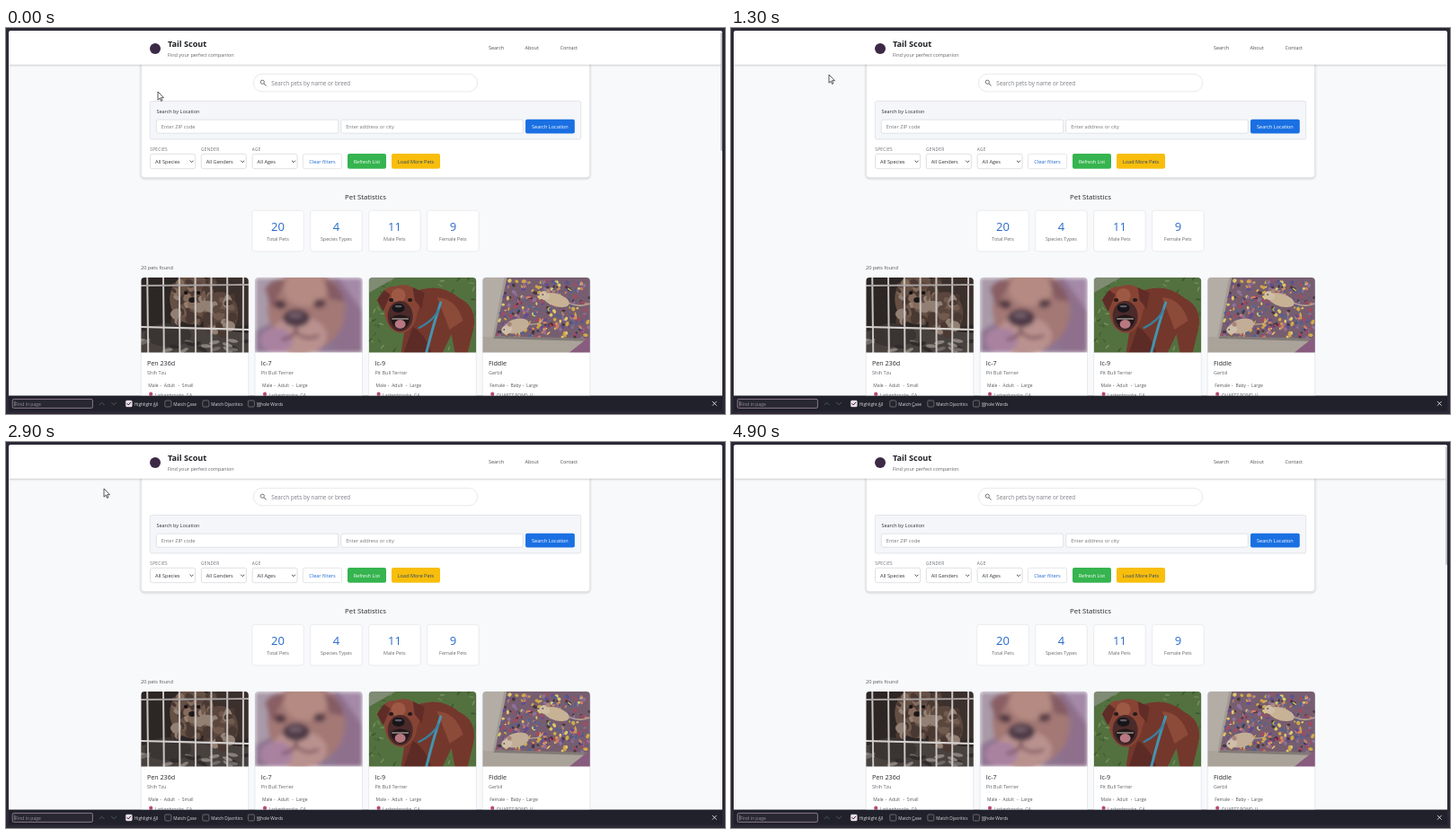
These frames come from a looping animation (800 px wide and 430 px high, 5000 ms). An HTML page:

```html
<!DOCTYPE html>
<html lang="en">
<head>
<meta charset="utf-8">
<title>Pet search page</title>
<style>
html, body { margin: 0; width: 100%; height: 100%; overflow: hidden; background: #2d2836; }
svg { display: block; width: 800px; height: 430px; }
text { font-family: "Open Sans", "Noto Sans", sans-serif; white-space: pre; }
</style>
</head>
<body>
<svg id="stage" viewBox="0 0 800 430"></svg>
<script>
const stage = document.getElementById('stage');

const text = (x, y, str, size, fill, extra = '') =>
  `<text x="${x}" y="${y}" font-size="${size}" fill="${fill}" ${extra}>${str}</text>`;
const mid = 'text-anchor="middle"';
const box = (x, y, w, h, r, fill, stroke = 'none', extra = '') =>
  `<rect x="${x}" y="${y}" width="${w}" height="${h}" rx="${r}" fill="${fill}" stroke="${stroke}" stroke-width=".7" ${extra}/>`;
const oval = (x, y, rx, ry, fill, turn = 0) =>
  `<ellipse cx="${x}" cy="${y}" rx="${rx}" ry="${ry}" fill="${fill}" transform="rotate(${turn} ${x} ${y})"/>`;
const shape = (d, fill) => `<path d="${d}" fill="${fill}"/>`;
const line = (d, stroke, w = 1) =>
  `<path d="${d}" fill="none" stroke="${stroke}" stroke-width="${w}" stroke-linecap="round" stroke-linejoin="round"/>`;

let seed = 7;
const rand = () => (seed = seed * 16807 % 2147483647) / 2147483647;
const times = (n, f) => Array.from({ length: n }, (_, i) => f(i)).join('');
const pick = list => list[Math.floor(rand() * list.length)];

// Photos, each 120 by 84
function cage() {
  const fur = ['#5b463d', '#715a4d', '#846b5b', '#4a3932', '#938074'];
  const tuft = (x, y, w, h) => oval(x + (rand() - .5) * w, y + (rand() - .5) * h,
    3 + rand() * 4, 2 + rand() * 4, pick(fur), rand() * 180);
  return box(0, 0, 120, 84, 0, '#2c2625') + shape('M0 60L40 54 120 62V84H0Z', '#48423f') +
    shape('M74 0H120V52L92 58Z', '#3c302c') +
    oval(57, 24, 25, 28, '#665044') + oval(88, 40, 20, 24, '#5a463e') + oval(30, 64, 26, 13, '#3a3433') +
    times(46, () => tuft(58, 27, 44, 50)) + times(26, () => tuft(88, 42, 30, 42)) +
    times(18, () => oval(rand() * 118, 68 + rand() * 15, 6, 2, pick(['#6f6a68', '#312c2c', '#87807b']), rand() * 60 - 30)) +
    oval(50, 17, 2.2, 2, '#171213') + oval(64, 17, 2.2, 2, '#171213') + oval(57, 25, 4, 3, '#1d1718') +
    times(7, i => line(`M${7 + i * 17.8} 0L${8 + i * 17.6} 84`, '#c9c5c3', 2)) +
    line('M0 9L120 8', '#aaa5a4', 1.8) + line('M0 55L120 58', '#d5d1ce', 2.2);
}

function closeUp() {
  return box(0, 0, 120, 84, 0, '#8d7591') + shape('M0 0H30L18 50 0 60Z', '#a99aa9') +
    shape('M78 0H120V84H90Z', '#8f6f8c') + shape('M93 0H120V38Z', '#a48aa8') +
    oval(57, 36, 43, 45, '#a37874', -8) + oval(56, 12, 24, 20, '#b48a82') +
    shape('M11 12Q24 -4 34 5L18 34Z', '#895f63') + shape('M77 2Q95 6 99 27L83 24Z', '#855c64') +
    oval(49, 65, 31, 22, '#b9918e') + oval(24, 70, 18, 14, '#a982a0') +
    oval(28, 30, 7, 5, '#553b43', 10) + oval(72, 29, 7, 5, '#5c3f48', -10) +
    oval(46, 45, 15, 10, '#4e3b46') + oval(45, 42, 8, 3, '#76606d') +
    line('M46 55Q46 66 31 69M46 61Q57 71 70 65', '#744f59', 3);
}

function leash() {
  return box(0, 0, 120, 84, 0, '#53713f') +
    times(90, () => oval(rand() * 120, rand() * 84, 3, .8, pick(['#6a8950', '#456237', '#78915f', '#3a5530']), rand() * 180)) +
    shape('M0 0H30L0 17Z', '#7f8b73') + shape('M46 18Q78 3 101 23Q120 32 117 55L110 84H96L92 63 82 84H36Z', '#74372c') +
    shape('M76 22Q97 23 105 48L90 58Z', '#8c4a38') + shape('M49 55Q62 62 70 84H39Z', '#5c2b26') +
    shape('M15 20Q17 9 29 10Q42 5 54 14Q61 24 54 40Q51 59 37 62Q22 61 18 43Z', '#874435') +
    shape('M17 14L9 25 16 38 24 19Z', '#602c27') + shape('M49 11L62 17 59 35 51 25Z', '#612c27') +
    oval(33, 20, 8, 8, '#9d5944') + oval(35, 43, 14, 17, '#4b2a2a') + oval(33, 34, 7, 5, '#171519') +
    oval(33, 32, 4, 1.3, '#5e5b65') + oval(25, 25, 2.6, 2, '#211a1c') + oval(46, 25, 2.6, 2, '#211a1c') +
    shape('M24 45Q35 38 46 45Q44 57 35 58Q26 56 24 45Z', '#211719') + oval(35, 52, 6, 5, '#b77882') +
    line('M26 46L44 46', '#d9cbc5', 1) + line('M80 28Q72 52 64 84', '#4594ae', 3) + line('M56 56Q72 48 78 36', '#397f9e', 2.5);
}

function bedding() {
  const bits = ['#d1a947', '#634c91', '#a9485f', '#4d6295', '#c88068', '#46383f', '#8f7198', '#dfc76a'];
  const chip = () => {
    const y = 3 + rand() * 65, x = 27 - y * .18 + rand() * (92 + y * .18);
    return oval(x, y, 1.2 + rand() * 1.6, .8 + rand() * 1.3, pick(bits), rand() * 180);
  };
  return box(0, 0, 120, 84, 0, '#a39c94') + shape('M0 0H24L11 67 0 69Z', '#b3ada6') +
    shape('M27 0H120V71L14 65Z', '#765e70') + times(300, chip) +
    shape('M0 66L120 69V84H0Z', '#aaa39a') + shape('M14 65L120 68V71L12 68Z', '#827a76') +
    shape('M96 84L120 65V84Z', '#885c7e') +
    line('M50 52Q66 53 67 46', '#c7aa93', 1.2) + oval(38, 54, 14, 8, '#c2ae96', -14) +
    oval(27, 58, 6, 5, '#cfbea9', -15) + oval(30, 52, 2.4, 2.6, '#a98278') + oval(24, 58, .8, .8, '#221b1c') +
    line('M95 28Q108 34 119 29', '#c8ad91', 1.3) + oval(82, 25, 15, 7, '#c7b296', 17) +
    oval(69, 20, 6, 5, '#d0bea4', 17) + oval(73, 15, 2.5, 2.5, '#af887c') + oval(67, 19, .8, .8, '#221b1c');
}

function petCard(x, photo, name, breed, facts, place, filter) {
  const xs = [8, 8 + facts[0].length * 2.9 + 6];
  xs.push(xs[1] + facts[1].length * 2.65 + 6.8);
  return box(x, 278, 119.6, 150, 4, '#fff', '#dfe1e5') +
    `<g transform="translate(${x} 278)"><g clip-path="url(#photo)"><g filter="url(#${filter})">${photo}</g></g>` +
    text(6.8, 98.2, name, 7.15, '#25272b') + text(6.8, 108, breed, 5.5, '#63666c') +
    facts.map((f, i) => text(xs[i], 122, f, 5, '#55585d') +
      (i ? oval(xs[i] - 3.7, 120.3, .5, .5, '#777') : '')).join('') +
    shape('M9 129.5A2 2 0 0 1 13 129.5Q13 131.5 11 134Q9 131.5 9 129.5Z', '#b84b72') +
    text(15.5, 132.7, place, 5, '#55585d') + '</g>';
}

const stat = (x, n, label) => box(x, 203.3, 57.6, 45.6, 3, '#fff', '#e2e4e8') +
  text(x + 28.8, 226, n, 13, '#2869cc', mid) + text(x + 28.8, 236.6, label, 5.45, '#65686d', mid);

const select = (x, label, value) =>
  text(x, 136.7, label, 4.65, '#63666c', 'letter-spacing=".35"') +
  box(x + .3, 140.3, 50, 16.4, 2, '#fff', '#d0d3d8') + text(x + 5.8, 151, value, 5.6, '#303238') +
  line(`M${x + 44.5} 148l1.7 1.7 1.7 -1.7`, '#333', .9);

const check = (x, label) => box(x, 415, 7, 7, 1.2, '#25242d', '#85838e') + text(x + 9.5, 420.6, label, 4.75, '#dedce3');
const key = c => `<tspan text-decoration="underline">${c}</tspan>`;

stage.innerHTML = `<defs>
  <clipPath id="page"><path d="M3 409.7V6Q3 3 6 3H794Q797 3 797 6V409.7Z"/></clipPath>
  <clipPath id="photo"><path d="M0 83.6V4Q0 0 4 0H115.6Q119.6 0 119.6 4V83.6Z"/></clipPath>
  <filter id="soft"><feGaussianBlur stdDeviation=".45"/></filter>
  <filter id="blurry"><feGaussianBlur stdDeviation="2.4"/></filter>
  <filter id="shade" x="-5%" y="-10%" width="110%" height="130%"><feDropShadow dx="0" dy=".8" stdDeviation="1" flood-opacity=".25"/></filter>
  </defs>` +
  box(0, 0, 800, 430, 0, '#2d2836') +
  '<g clip-path="url(#page)">' + box(3, 3, 794, 407, 0, '#f8f9fb') +
  box(150.3, 36, 499.4, 130.7, 4, '#fff', '#d8dade', 'filter="url(#shade)"') +
  box(3, 0, 794, 40.6, 0, '#fff', 'none', 'filter="url(#shade)"') +
  oval(166, 23, 6, 6, '#3c2946') +
  text(180, 21.4, 'Tail Scout', 9.1, '#1d1f23', 'font-weight="700"') +
  text(180, 31.8, 'Find your perfect companion', 5.48, '#606369') +
  text(537, 24.1, 'Search', 5.45, '#4d5056') + text(577.5, 24.1, 'About', 5.45, '#4d5056') +
  text(616.5, 24.1, 'Contact', 5.45, '#4d5056') +

  box(275.3, 51.3, 249.4, 19.6, 9.8, '#fff', '#dcdee2') +
  '<circle cx="285.3" cy="60.2" r="2.1" fill="none" stroke="#666" stroke-width=".9"/>' + line('M287 62l2.2 2.2', '#666', 1) +
  text(295.3, 64.1, 'Search pets by name or breed', 6.3, '#7b7e84') +
  box(160.3, 81.5, 479.4, 42.5, 2, '#f4f6f9', '#d9dce1') +
  text(167.4, 95.2, 'Search by Location', 5.5, '#303238') +
  box(167.3, 102.2, 202.4, 15, 2, '#fff', '#d5d8dd') + text(172.8, 112, 'Enter ZIP code', 5.62, '#73767b') +
  box(372.8, 102.2, 202.4, 15, 2, '#fff', '#d5d8dd') + text(378.2, 112, 'Enter address or city', 5.62, '#73767b') +
  box(578, 101.8, 54.8, 15.6, 2, '#1a70e2') + text(605.4, 112, 'Search Location', 5.53, '#fff', mid) +
  select(160.3, 'SPECIES', 'All Species') + select(217, 'GENDER', 'All Genders') + select(273.8, 'AGE', 'All Ages') +
  box(330.4, 140.3, 43.2, 16.4, 2, '#fff', '#dadce1') + text(352, 150.9, 'Clear filters', 5.55, '#2068d0', mid) +
  box(380, 140, 43, 16.8, 2, '#35b44f') + text(401.5, 150.9, 'Refresh List', 5.45, '#fff', mid) +
  box(429, 140, 54, 16.8, 2, '#f8be0b') + text(456, 150.9, 'Load More Pets', 5.55, '#27446f', mid) +

  text(400, 190.6, 'Pet Statistics', 7.8, '#25272b', mid) +
  stat(273.7, 20, 'Total Pets') + stat(338.6, 4, 'Species Types') + stat(403.6, 11, 'Male Pets') + stat(468.6, 9, 'Female Pets') +
  text(150, 269.1, '20 pets found', 5.57, '#55585e') +
  petCard(150.2, cage(), 'Pen 236d', 'Shih Tzu', ['Male', 'Adult', 'Small'], 'Larkenbrooke, GA', 'soft') +
  petCard(277, closeUp(), 'Ic-7', 'Pit Bull Terrier', ['Male', 'Adult', 'Large'], 'Larkenbrooke, GA', 'blurry') +
  petCard(403.6, leash(), 'Ic-9', 'Pit Bull Terrier', ['Male', 'Adult', 'Large'], 'Larkenbrooke, GA', 'soft') +
  petCard(530.2, bedding(), 'Fiddle', 'Gerbil', ['Female', 'Baby', 'Large'], 'QUARTZ POND, IL', 'soft') +
  `<g id="bar">${box(795.3, 5, 1.7, 132, .8, '#b5b4ba')}</g></g>` +

  box(3, 409.7, 794, 17, 0, '#20212b') +
  box(7.2, 413.4, 89.2, 10, 1.5, '#292832', '#b69bb5') + line('M9.8 416v5', '#ddd', .5) +
  text(10.3, 420.5, 'Find in page', 5.05, '#92909b') +
  line('M104 419.8l2.6 -2.6 2.6 2.6M117.5 417.2l2.6 2.6 2.6 -2.6', '#5c5a66', .9) +
  check(133.3, `Highlight ${key('A')}ll`) +
  box(133.3, 415, 7, 7, 1.2, '#ecdfea') + line('M134.8 418.5l1.4 1.5 2.6 -3', '#33283a', 1) +
  check(176.8, `Match ${key('C')}ase`) + check(218.8, `Match D${key('i')}acritics`) + check(269.4, `${key('W')}hole Words`) +
  line('M786.2 416.2l4.2 4.2M790.4 416.2l-4.2 4.2', '#dedce3', .9) +
  '<path id="cursor" d="M0 0V9.2L2.1 7.2 3.5 10.4 4.9 9.8 3.5 6.7H6.4Z" fill="#fff" stroke="#222" stroke-width=".75" stroke-linejoin="round"/>';

// Pointer path: time, x, y
const path = [[0, 169, 71], [700, 133, 82], [1300, 109, 52], [2900, 109, 52],
  [3400, 106, 52], [3500, 106, 52], [4000, 673, 185], [4200, 798, 212]];
const cursor = document.getElementById('cursor');
const bar = document.getElementById('bar');

function draw(now) {
  const t = Math.floor(now % 5000 / 100) * 100;
  const i = path.findIndex(p => p[0] > t);
  cursor.style.display = i < 0 ? 'none' : '';
  bar.style.display = t < 500 || t >= 4200 ? '' : 'none';
  if (i > 0) {
    const [a, b] = [path[i - 1], path[i]];
    const k = (t - a[0]) / (b[0] - a[0]);
    cursor.setAttribute('transform', `translate(${a[1] + (b[1] - a[1]) * k} ${a[2] + (b[2] - a[2]) * k})`);
  }
}

const start = performance.now();
function tick() {
  draw(performance.now() - start);
  requestAnimationFrame(tick);
}
tick();
</script>
</body>
</html>
```
